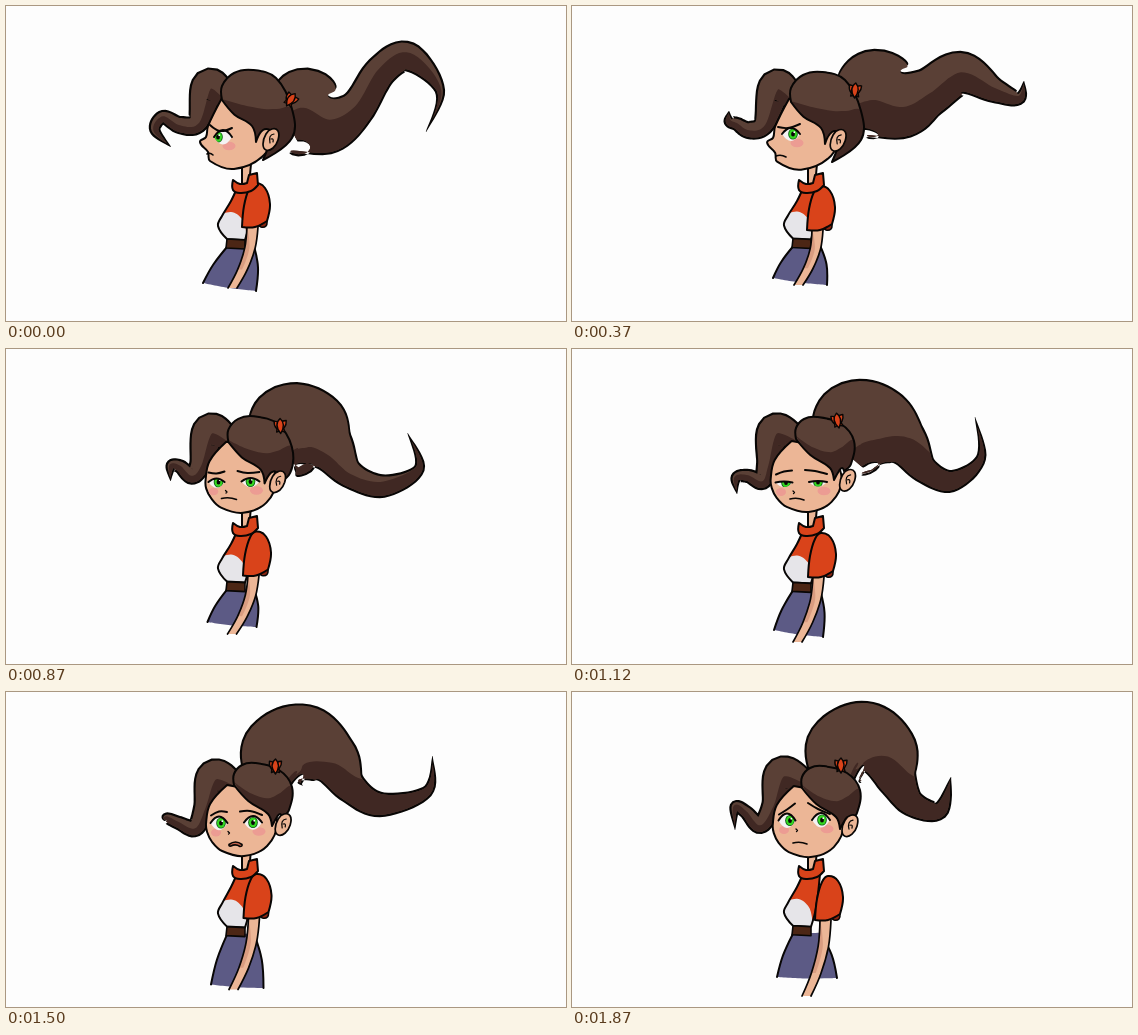
An HTML page that plays this animation: 560x315 px, repeating every 2 s.

```html
<!DOCTYPE html>
<html lang="en">
<head>
<meta charset="utf-8">
<title>Head turn</title>
<style>
html, body { margin: 0; width: 100%; height: 100%; overflow: hidden; background: #fdfdfd; }
svg { display: block; width: 100vw; height: 100vh; }
</style>
</head>
<body>
<svg id="stage" viewBox="0 0 560 315" stroke-linecap="round" stroke-linejoin="round"></svg>
<script>
const LOOP = 2000;
// Start time of each drawing; odd drawings are halfway between two key poses.
const STARTS = [0, 120, 370, 500, 620, 870, 1120, 1250, 1370, 1500, 1620, 1750, 1870];
// Follow-through of the ponytail when it whips outwards.
const SWING = { 1: 14, 5: 29, 9: 37 };
const INK = '#080605', HAIR = '#5a4036', DARK = '#402823', SKIN = '#ecb696',
  SKIN_DARK = '#d99c80', RED = '#d9431a', WHITE = '#e6e5e9', BLUE = '#5c5a85',
  BELT = '#4c2615', BLUSH = '#ec9c93';

// tail: spine points x,y,width; lit: depth of the light side, key where it ends; pig: spine points
// head: face turn, hair turn, shift x,y; body: shoulder, left hem, right hem, hand
// look: eye x,y, lid opening, iris shift; brow: heights; mouth: x,y, half width, opening; tie: x,y, angle
const POSES = [
  {
    tail: '280,113,48 297,106,87 324,117,60 351,102,36 375,65,31 403,51,28 434,85,8 420,126,0', lit: '.45,8',
    pig: '220,92 203,80 192,116 174,119 157,111 149,124 165,141',
    head: '0,0,0,0', body: '249,177 197,277 250,285 222,282',
    look: '217,131,7,-5', brow: '-12,-6,-9', mouth: '204,148,3,0', tie: '284,95,35'
  },
  {
    tail: '277,97,56 302,88,88 331,97,70 357,86,48 389,67,42 422,84,24 447,92,12 452,75,0', lit: '.57,7.5',
    pig: '221,92 204,81 192,118 177,124 165,118 157,115 157,105',
    head: '0,0,3,2', body: '248,180 201,272 255,279 222,279',
    look: '219,128,6,2', brow: '-7,-6,-10', mouth: '209,150,5,0', tie: '283,86,5'
  },
  {
    tail: '271,98,67 285,84,90 303,86,82 317,107,50 330,130,28 354,142,22 380,130,10 368,100,0', lit: '.75,8',
    pig: '222,93 205,82 193,116 181,121 172,108 166,105 164,119',
    head: '.9,.1,4,2', body: '251,181 201,265 250,268 222,277',
    look: '243,132,6,0', brow: '-9,-6,-11', mouth: '221,149,8,0', tie: '283,84,5'
  },
  {
    tail: '266,97,64 284,79,94 313,83,82 335,97,46 353,121,26 380,132,20 409,109,8 403,68,0', lit: '.7,3.6',
    pig: '226,90 203,82 195,116 190,132 176,127 164,129 165,145',
    head: '1,1,-1,-3', body: '249,184 202,281 251,288 221,293',
    look: '246,133,1,0', brow: '-12,-11,-8', mouth: '225,150,7,0', tie: '266,73,-10'
  },
  {
    tail: '258,81,43 267,55,67 294,47,71 317,63,57 329,94,37 346,118,26 383,114,12 389,78,0', lit: '1,4.2',
    pig: '226,96 206,88 196,122 188,140 172,136 159,134 156,121',
    head: '1,1,0,0', body: '251,183 204,296 255,297 218,299',
    look: '246,131,6,0', brow: '-8,-9,-6', mouth: '232,152,10,1', tie: '268,78,-5'
  },
  {
    tail: '264,92,53 275,68,82 304,58,86 338,75,50 353,97,25 379,107,20 410,85,8 412,50,0', lit: '.8,4',
    pig: '232,88 210,82 200,110 190,132 174,126 162,118 161,137',
    head: '1,1,6,0', body: '250,181 206,289 260,295 228,296',
    look: '248,130,7,0', brow: '-14,-14,-9', mouth: '227,151,3,0', tie: '271,74,5'
  },
  {
    tail: '260,87,42 266,58,67 292,50,80 315,62,64 326,90,38 341,112,25 368,118,16 379,85,0', lit: '.9,4.1',
    pig: '234,90 210,82 200,114 188,133 174,120 163,115 163,138',
    head: '1,1,5,3', body: '256,184 205,285 265,286 230,304',
    look: '249,128,7,1', brow: '-17,-11,-6', mouth: '228,151,7,0', tie: '269,75,0'
  }
];

// Side view and turned view of the head.
const FACE = [
  list('216,92 202,120 200,131 194,136 202,146 204,155 228,163 258,149 265,125 250,95'),
  list('220,93 203,112 199,131 200,140 205,150 215,159 237,164 260,154 270,130 258,100')
];
const CAP = [
  list('216,94 216,80 228,67 247,64 270,72 286,103 286,132 257,154 265,126 257,124 250,136 246,120'),
  list('225,93 225,82 233,73 246,71 270,78 283,95 280,118 273,125 271,122 268,125 263,134 259,122')
];
const EAR = list('-7,5 -4,-5 2,-10 8,-8 8,1 3,9 -4,11');
const COLLAR = list('-12,0 -5,4 2,3 4,-5 12,-7 13,5 6,11 -5,13 -12,10');
const NECK = [239, 174];
const PIG_WIDTHS = [22, 34, 20, 16, 12, 9, 0];

function nums(s) { return s.split(/[ ,]+/).map(Number); }
function list(s) { return s.split(' ').map(nums); }
function lerp(a, b, t) { return a.map((v, i) => v + (b[i] - v) * t); }
function mix(a, b, t) { return a.map((p, i) => lerp(p, b[i], t)); }
function add(p, x, y) { return [p[0] + x, p[1] + y, ...p.slice(2)]; }
function shift(points, x, y) { return points.map(p => add(p, x, y)); }
function xy(p) { return p.slice(0, 2).map(v => v.toFixed(1)).join(' '); }

// Smooth path through points; listed corners stay sharp.
function curve(p, corners = [], open = false) {
  const n = p.length;
  const dir = p.map((_, i) => {
    if (corners.includes(i) || open && (i === 0 || i === n - 1)) return [0, 0];
    const a = p[(i + n - 1) % n], b = p[(i + 1) % n];
    const len = Math.hypot(b[0] - a[0], b[1] - a[1]) || 1;
    return [(b[0] - a[0]) / len, (b[1] - a[1]) / len];
  });
  let d = 'M' + xy(p[0]);
  for (let i = 0; i < (open ? n - 1 : n); i++) {
    const j = (i + 1) % n, a = p[i], b = p[j];
    const k = Math.hypot(b[0] - a[0], b[1] - a[1]) * 0.36;
    d += 'C' + xy(add(a, dir[i][0] * k, dir[i][1] * k)) + ' ' +
      xy(add(b, -dir[j][0] * k, -dir[j][1] * k)) + ' ' + xy(b);
  }
  return open ? d : d + 'Z';
}

function fill(d, color) { return `<path d="${d}" fill="${color}"/>`; }
function line(d, w = 2) { return `<path d="${d}" fill="none" stroke="${INK}" stroke-width="${w}"/>`; }
function stroke(points, w) { return line(curve(points, [], true), w); }
function shape(d, color, w) { return fill(d, color) + line(d, w); }
function oval(x, y, rx, ry, color) {
  return `<ellipse cx="${x}" cy="${y}" rx="${rx}" ry="${ry}" fill="${color}"/>`;
}
let clips = 0;
function clipped(d, inner) {
  const id = 'clip' + clips++;
  return `<clipPath id="${id}"><path d="${d}"/></clipPath><g clip-path="url(#${id})">${inner}</g>`;
}
function twoTone(d, color, shade, shadeColor) {
  return fill(d, color) + clipped(d, fill(shade, shadeColor)) + line(d);
}

// Catmull-Rom samples of a spine, with the key position appended.
function sample(keys, steps = 10) {
  const key = i => keys[Math.max(0, Math.min(keys.length - 1, i))];
  const out = [];
  for (let n = 0; n <= (keys.length - 1) * steps; n++) {
    const i = Math.floor(n / steps), t = n / steps - i;
    const [a, b, c, d] = [key(i - 1), key(i), key(i + 1), key(i + 2)];
    out.push([...b.map((v, j) => v + t / 2 * (c[j] - a[j] +
      t * (2 * a[j] - 5 * v + 4 * c[j] - d[j] + t * (3 * (v - c[j]) + d[j] - a[j])))), n / steps]);
  }
  return out;
}

// Lock of hair: a spine with width, a tapering outline and shade below the lit side.
function strand(keys, up, [depth, end]) {
  const spine = sample(keys);
  const edge = (side, width) => spine.map((p, i) => {
    const a = spine[Math.max(0, i - 1)], b = spine[Math.min(spine.length - 1, i + 1)];
    const tx = b[0] - a[0], ty = b[1] - a[1];
    const r = width(Math.max(0, p[2])) / 2 * up * side(p[3]) / (Math.hypot(tx, ty) || 1);
    return [p[0] + ty * r, p[1] - tx * r];
  });
  const band = (side, width) =>
    'M' + [...edge(side, width), ...edge(() => -1, width).reverse()].map(xy).join('L') + 'Z';
  const outer = w => w + Math.min(2.4, 0.4 + w * 0.3), inner = w => Math.max(0, w - 2);
  const lit = k => 1 - 2 * depth * Math.max(0, 1 - (k / end) ** 3);
  return fill(band(() => 1, outer), INK) + fill(band(() => 1, inner), HAIR) + fill(band(lit, inner), DARK);
}

function drawBody([shoulder, hemL, hemR, hand]) {
  const waist = [230, 233 + (hemL[1] - 277) * 0.1];
  const from = (p, s) => shift(list(s), ...p);
  const shirt = [...from(NECK, '-8,8 -14,21'), ...from(waist, '-14,-23 -18,-13 -9,0 9,1 14,-18'), add(NECK, 9, 8)];
  const white = from(waist, '-20,-22 -5,-27 6,-20 10,-8 10,2 -20,2');
  const belt = from(waist, '-9,0 9,1 9,10 -10,9');
  const hipL = add(waist, -9, 8), hipR = add(waist, 18, 7);
  const skirtL = [hipL, add(lerp(hipL, hemL, 0.5), -2, 0), hemL];
  const skirtR = [hemR, add(lerp(hipR, hemR, 0.5), 3, -1), hipR];
  const cuff = add(shoulder, 12, 38);
  const sleeve = [...from(shoulder, '-6,6 0,0 10,5'), ...from(cuff, '3,-17 0,0 -12,6 -25,6'), add(shoulder, -11, 23)];
  const limb = (a, b) => [0, 0.35, 0.7, 1].map(t => add(lerp(a, b, t), 5 * Math.sin(Math.PI * t), 0));
  const armL = limb(add(cuff, -20, 5), hand), armR = limb(add(cuff, -9, 6), add(hand, 9, 0));
  const arm = [...armL, ...armR.slice().reverse()];
  const armShade = [...armL.slice(0, 3), lerp(armL[2], armR[2], 0.45), lerp(armL[1], armR[1], 0.45)];
  return shape(curve(from(NECK, '-3,-16 -3,6 4,5 6,-16'), [0, 1, 2, 3]), SKIN) +
    fill(curve([...skirtL, add(lerp(hemL, hemR, 0.5), 0, 1), ...skirtR], [0, 2, 4, 6]), BLUE) +
    stroke(skirtL) + stroke(skirtR) +
    twoTone(curve(shirt, [0, 4, 5, 7]), RED, curve(white, [0, 4, 5]), WHITE) +
    shape(curve(belt, [0, 1, 2, 3]), BELT, 1.6) +
    fill(curve(arm, [0, 3, 4, 7]), SKIN) + fill(curve(armShade, [0, 2, 3]), SKIN_DARK) +
    stroke(armL, 1.7) + stroke(armR, 1.7) +
    shape(curve(from(cuff, '0,0 -11,2 -6,6 -1,5'), [0, 1]), '#8c2511', 1.6) +
    shape(curve(sleeve, [4, 6]), RED) +
    shape(curve(shift(COLLAR, ...NECK), [0, 2, 3, 4, 5]), RED);
}

function drawEye(x, y, w, open, ix) {
  const lid = `M${x - w} ${y}Q${x} ${y - 2 * open} ${x + w} ${y}`;
  const lens = lid + `Q${x} ${y + 8 + open} ${x - w} ${y}Z`;
  const iris = oval(ix, y, 4.8, 5.6, '#0c5a14') + oval(ix, y, 4, 4.8, '#35d722') +
    oval(ix, y, 1.9, 2.5, INK) + oval(ix + 1.3, y - 1.8, 0.9, 0.9, '#fff');
  return fill(lens, '#f4f2f3') + clipped(lens, iris) + line(lid, 2);
}

function drawFeatures({ look: [x, y, open, gaze], brow, mouth: [mx, my, mw, gape] }, turn) {
  const far = [x - 34, y + 0.5];
  const l = mx - mw, r = mx + mw;
  const lips = `M${l} ${my + gape * 2}Q${mx} ${my - 2 - gape * 4} ${r} ${my + 1}` +
    `q${gape} ${gape * 4} ${-4 * gape} ${gape * 4}Q${mx} ${my - 2 + gape * 4} ${l + 4 * gape} ${my + gape * 5}` +
    `q${-5 * gape} ${gape} ${-4 * gape} ${-3 * gape}`;
  const arch = (p, xs) => stroke(xs.map((v, i) => add(p, v, brow[i])), 2);
  const farSide = turn < 0.3 ? '' : drawEye(...far, 8.5 * turn, open, far[0] + gaze + 2) +
    arch(far, [8, 0, -8]) + line(`M${x - 25} ${y + 9}l1.5 1.5l-1 1`, 1.3);
  return farSide + drawEye(x, y, 9, open, x + gaze) + arch([x, y], [-13, -3, 9]) +
    shape(lips, gape ? '#c9654e' : 'none', 1.6);
}

function drawHead(pose) {
  const [turn, hairTurn, dx, dy] = pose.head;
  const face = curve(shift(mix(...FACE, turn), dx * 0.35, dy * 0.35), [0, 9]);
  const cap = shift(mix(...CAP, hairTurn), dx, dy);
  const fringe = add(lerp(cap[11], cap[0], 0.55), -1, 3);
  const sag = 0.3 + 0.7 * hairTurn;
  const rim = (t, s) => add(lerp(cap[0], cap[5], t), 0, s * sag);
  const shade = [rim(0, -3), rim(0.3, 8), rim(0.6, 12), rim(0.78, 7), ...cap.slice(5), fringe];
  const ear = add(lerp([264, 133], [275, 132], hairTurn), dx * 0.4, dy * 0.4);
  const [x, y] = pose.look, [tx, ty, angle] = pose.tie;
  const petals = [-42, 42, 0].map(a =>
    `<g transform="rotate(${a})">${shape('M0 6Q-7 -3 0 -9Q6 -3 0 6', RED, 1.4)}</g>`).join('');
  return shape(face, SKIN) +
    clipped(face, oval(x + 6, y + 9, 6.5, 4.2, BLUSH) + oval(x - 37, y + 10, 5 * turn, 4 * turn, BLUSH)) +
    drawFeatures(pose, turn) +
    twoTone(curve([...cap, fringe], [0, 7, 10]), HAIR, curve(shade, [0, 6, 9]), DARK) +
    shape(curve(shift(EAR, ...ear)), SKIN, 1.7) +
    line(`M${ear[0] + 4} ${ear[1] - 5}q-6 1 -4 9m1 -4q3 -1 2 3`, 1.2) +
    `<g transform="translate(${tx} ${ty}) rotate(${angle})">${petals}</g>`;
}

function readPose(value) {
  const a = POSES[Math.floor(value)], b = POSES[Math.ceil(value)], t = value % 1;
  const pose = {};
  for (const key in a) {
    const points = mix(list(a[key]), list(b[key]), t);
    pose[key] = points.length > 1 ? points : points[0];
  }
  return pose;
}

function draw(k) {
  const pose = readPose(k / 2), swing = SWING[k] || 0;
  const tail = pose.tail.map(p => add(p, swing * Math.max(0, p[0] - 330) / 100, 0));
  const pig = pose.pig.map((p, i) => [...p, PIG_WIDTHS[i]]);
  clips = 0;
  return '<rect width="560" height="315" fill="#fdfdfd"/>' +
    strand(pig, -1, [0.6, 6]) + strand(tail, 1, pose.lit) + drawBody(pose.body) + drawHead(pose);
}

const stage = document.getElementById('stage');
const drawings = STARTS.map((_, k) => draw(k));
let shown = -1;
function update() {
  const t = performance.now() % LOOP;
  const k = STARTS.filter(s => s <= t).length - 1;
  if (k !== shown) stage.innerHTML = drawings[shown = k];
  requestAnimationFrame(update);
}
update();
</script>
</body>
</html>
```
